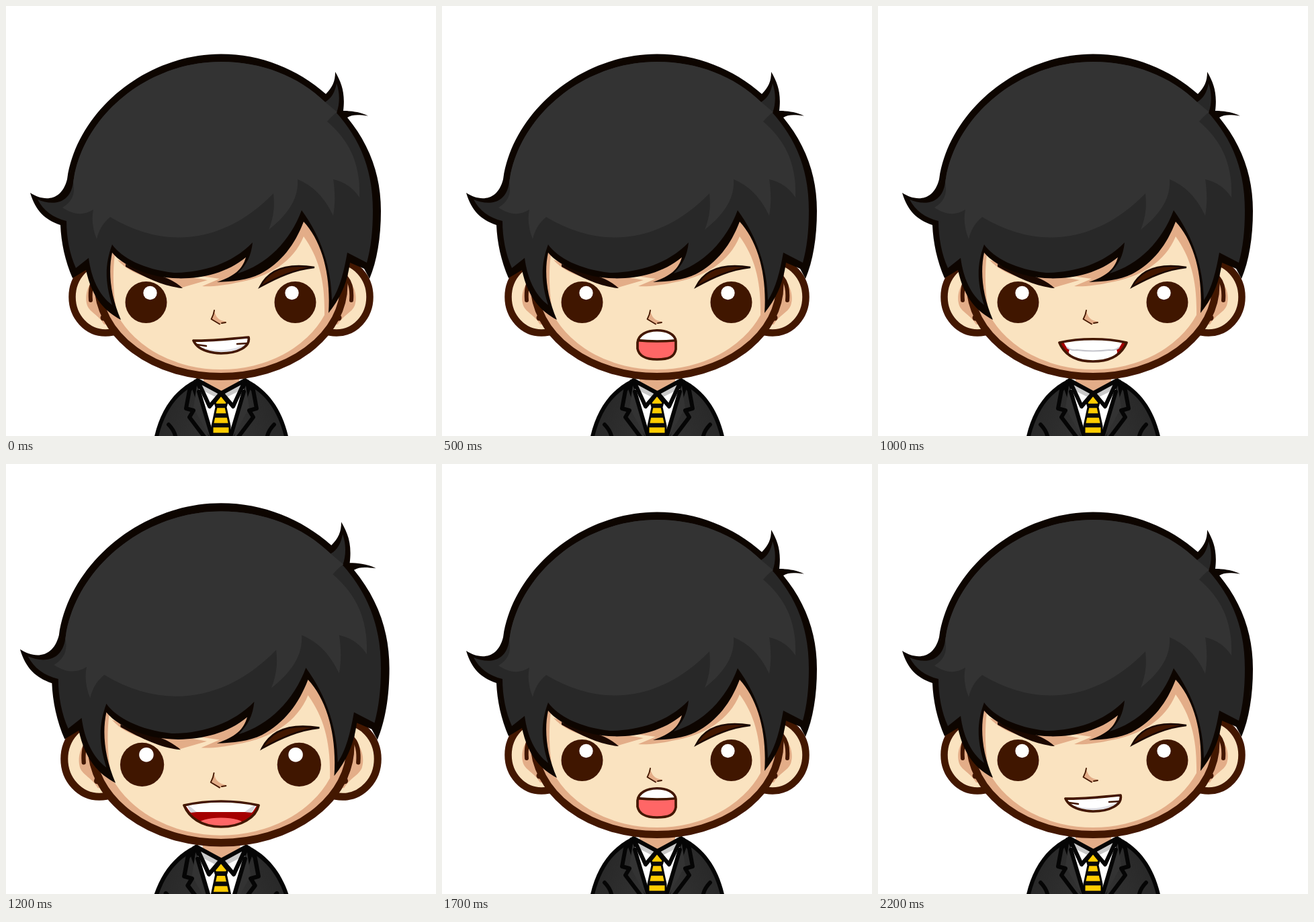
An HTML page for the animation above (2400 ms loop, 640x640 px).

```html
<!DOCTYPE html>
<html lang="en">
<head>
<meta charset="utf-8">
<title>Talking character</title>
<style>
  html, body { margin: 0; width: 100%; height: 100%; overflow: hidden; background: #fff; }
  svg { display: block; width: 100vw; height: 100vh; }
  .ink { fill: none; stroke: #050505; stroke-width: 6; stroke-linejoin: round; stroke-linecap: round; }
  .brown { stroke: #431700; }
</style>
</head>
<body>
<svg viewBox="0 0 640 640">
  <defs>
    <linearGradient id="cloth" x1="0" x2="1" y1="0" y2="0.5">
      <stop offset="0" stop-color="#555"/>
      <stop offset="0.35" stop-color="#292929"/>
      <stop offset="1" stop-color="#303030"/>
    </linearGradient>

    <g id="ear">
      <ellipse cx="148" cy="433" rx="49.500" ry="53.500" fill="#fae3c0" stroke="#431700" stroke-width="10.500"/>
      <path d="M139 402C122 410 116 430 121 446C125 456 138 460 146 474L165 474V402Z" fill="#e3ad88"/>
      <path d="M133 405C127 412 125 425 126 438" class="ink brown"/>
      <circle cx="145" cy="464" r="4.500" fill="#431700"/>
    </g>

    <g id="half-suit">
      <path d="M220 645C229 602 250 572 282 556L305 596L311 645Z" fill="#050505"/>
      <path d="M226 645C235 605 253 580 276 567L303 645Z" fill="url(#cloth)"/>
      <path d="M284 565L279 598L305 645V612Z" fill="#333"/>
      <path d="M287 570L311 645H321V575L309 575Z" fill="#fff"/>
      <path d="M282 559L273 572L268 599L279 602L273 612L298 645M287 574L308 645M253 645C252 635 248 629 242 623" class="ink"/>
      <path d="M286 558L320 576L303 595Z" fill="#fff"/>
      <path d="M286 558L320 576L312 582L290 571Z" fill="#c9c9c9"/>
      <path d="M285 557L320 576L303 596Z" class="ink"/>
    </g>

    <clipPath id="tie"><path d="M320 579L329 590L327 597L333 625V645H307V625L313 597L311 590Z"/></clipPath>
  </defs>

  <rect width="640" height="640" fill="#fff"/>
  <g id="character">
    <path d="M294 545H347V568L320.500 580L294 564Z" fill="#e3ad88"/>
    <use href="#half-suit"/>
    <use href="#half-suit" transform="translate(641) scale(-1 1)"/>
    <g clip-path="url(#tie)">
      <path d="M300 575H340V645H300Z" fill="#fc0"/>
      <path d="M300 595H340M300 609.500H340M300 624H340M300 638.500H340" stroke="#0b0b0b" stroke-width="6.500"/>
    </g>
    <path d="M320 579L329 590L327 597L333 625V645M320 579L311 590L313 597L307 625V645" class="ink" style="stroke-width:3"/>

    <use href="#ear"/>
    <use href="#ear" transform="translate(640) scale(-1 1)"/>
    <path d="M137 415A183 136.500 0 0 0 503 415V300H137Z" fill="#e3ad88" stroke="#431700" stroke-width="11"/>
    <path d="M162 370C158 400 160 435 166 460A168 135 0 0 0 474 460C475 410 466 375 443 343C428 380 392 404 342 412C325 416 305 418 292 417L318 406L240 395Z" fill="#fae3c0"/>
    <path d="M166 378C190 404 220 405 262 419L300 408L230 395Z" fill="#e3ad88"/>

    <path d="M178 384C211 398 240 399 263 420C237 418 211 406 178 388Z" fill="#1b0800"/>
    <path d="M378 418C388 398 409 381 459 389C430 392 405 403 378 418Z" fill="#431700" stroke="#1b0800" stroke-width="2.500"/>
    <g fill="#401600"><circle cx="208.500" cy="441" r="31"/><circle cx="430.500" cy="441" r="31"/></g>
    <g fill="#fff"><circle cx="214.500" cy="427" r="10.200"/><circle cx="425.500" cy="427" r="10.200"/></g>
    <path d="M310 453C309 460 306 463 305 466L318 474L328 470C316 468 312 463 310 453Z" fill="#e3ad88"/>
    <path d="M310 453C309 460 307 463 305.500 466L318 473.500M321 472L327 471" class="ink brown" style="stroke-width:1.800"/>

    <path d="M36 278C54 290 82 293 91 258C105 158 206 71.500 320 71.500C380 71.500 434 94 476 131C486 121 490 112 490 98C500 115 505 130 502 156C512 156 526 157 539 163.500C525 162 516 161 508 166C540 205 558 250 558 305C558 345 552 380 541 406L533 391L512 382C508 410 500 432 480 457C484 400 470 350 443 321C430 355 410 382 378 399C360 408 337 410 314 411C340 402 352 392 357 374C320 405 265 410 225 402C195 395 170 382 158 367C152 395 155 430 171 467C148 455 128 435 119 393L99 405C88 380 82 352 81 326C58 318 44 305 36 278Z" fill="#0d0500"/>
    <path d="M47 288C68 297 95 296 100 263C113 165 209 83 320 83C380 83 435 104 475 143C485 137 490 127 492 115C497 130 497 145 492 159L498 166C534 210 546 255 546 305C546 335 543 360 537 382L508 367C503 395 497 420 485 438C484 390 470 345 440 304C423 350 388 385 345 398C358 385 365 372 367 352C335 385 290 397 250 397C205 392 172 375 158 355C147 385 147 410 158 445C138 430 127 405 123 375L104 390C95 370 90 345 90 320C70 315 56 305 47 288Z" fill="#282828"/>
    <path d="M100 263C113 165 209 83 320 83C380 83 435 104 475 143L493 158C488 161 483 166 478 172C511 200 528 235 526 285C516 270 504 262 487 258C490 278 490 295 487 312C474 285 458 268 434 258C436 287 419 311 391 333C399 313 400 297 398 279C325 354 236 363 155 314C144 323 138 334 135 347C129 332 127 317 130 303C114 313 99 310 84 300C97 292 104 281 100 263Z" fill="#333"/>
  </g>
  <g id="mouths"></g>
</svg>

<script>
const LOOP = 2400;

// Each mouth: outline, cavity colour, and the parts clipped inside it.
const MOUTHS = {
  smirk: ["M279 498C305 499 335 495 361 493C364 507 345 517 320 517C298 516 284 509 279 498Z", "#fff",
    `<path d="M284 506C310 516 340 514 362 500V525H284Z" fill="#e0e0e6"/>
     <path d="M284 504L298 506M344 503L360 502" class="ink brown" style="stroke-width:2.5"/>`],
  round: ["M291 501C293 477 346 477 348 499V511C346 522 338 526 320 526C301 526 293 520 291 510Z", "#ff6666",
    `<path d="M285 478H355V497Q320 501 285 497Z" fill="#fff" class="brown" stroke-width="3.5"/>`],
  grin: ["M270 501C300 494 340 494 370 501C362 520 345 529 320 529S278 520 270 501Z", "#a50000",
    `<path d="M275 497C305 494 335 494 365 497C361 508 356 513 350 513H290C284 513 279 508 275 497Z" fill="#fff"/>
     <path d="M288 510H352C358 512 357 518 352 523C338 530 302 530 288 523C283 518 282 512 288 510Z" fill="#fff"/>
     <path d="M281 508Q286 513 296 512Q320 515 344 512Q354 513 359 508" fill="none" stroke="#c5c5cc" stroke-width="2"/>`],
  wide: ["M265 508C300 500 340 500 376 508C372 526 350 540 320 540S272 525 265 508Z", "#a50000",
    `<path d="M260 498H380L367 518H274Z" fill="#fff"/>
     <path d="M268 505L275 519L284 518ZM373 505L366 519L355 518Z" fill="#d5d5da"/>
     <ellipse cx="320" cy="537" rx="35" ry="10.500" fill="#ff6666"/>`],
  open: ["M286 497C305 494.500 330 494.500 346 497C356 499 357 507 356 517C355 530 350 541 340 547C333 551 325 549.500 312 549C292 547 275 535 274 515C273 505 277 499 286 497Z", "#a50000",
    `<path d="M274 490H356V511C330 518 290 518 274 508Z" fill="#fff"/>
     <ellipse cx="311" cy="543" rx="35" ry="15" fill="#ff6666" class="brown" stroke-width="2.5"/>`]
};

// Start time in ms and mouth; the wide and open mouths go with the bounce.
const TIMELINE = [
  [0, "smirk"], [200, "round"], [400, "wide"], [500, "round"], [700, "open"],
  [800, "round"], [1000, "grin"], [1200, "wide"], [1300, "open"], [1400, "round"],
  [1600, "wide"], [1700, "round"], [1900, "open"], [2000, "round"], [2200, "smirk"]
];

const character = document.getElementById("character");
const mouths = document.getElementById("mouths");

mouths.innerHTML = Object.entries(MOUTHS).map(([name, [outline, color, parts]]) => `
  <g id="${name}">
    <clipPath id="${name}-clip"><path d="${outline}"/></clipPath>
    <path d="${outline}" fill="${color}"/>
    <g clip-path="url(#${name}-clip)">${parts}</g>
    <path d="${outline}" class="ink brown" style="stroke-width:3.7"/>
  </g>`).join("");

function draw(now) {
  const time = now % LOOP;
  const [, mouth] = TIMELINE.findLast(([start]) => start <= time);
  const scale = mouth === "wide" || mouth === "open" ? 1.053 : 1;
  character.setAttribute("transform", `translate(320 320) scale(${scale}) translate(-320 -320)`);
  for (const shape of mouths.children) {
    shape.style.display = shape.id === mouth ? "" : "none";
  }
}

const startTime = performance.now();
function tick() {
  draw(performance.now() - startTime);
  requestAnimationFrame(tick);
}
tick();
</script>
</body>
</html>
```
